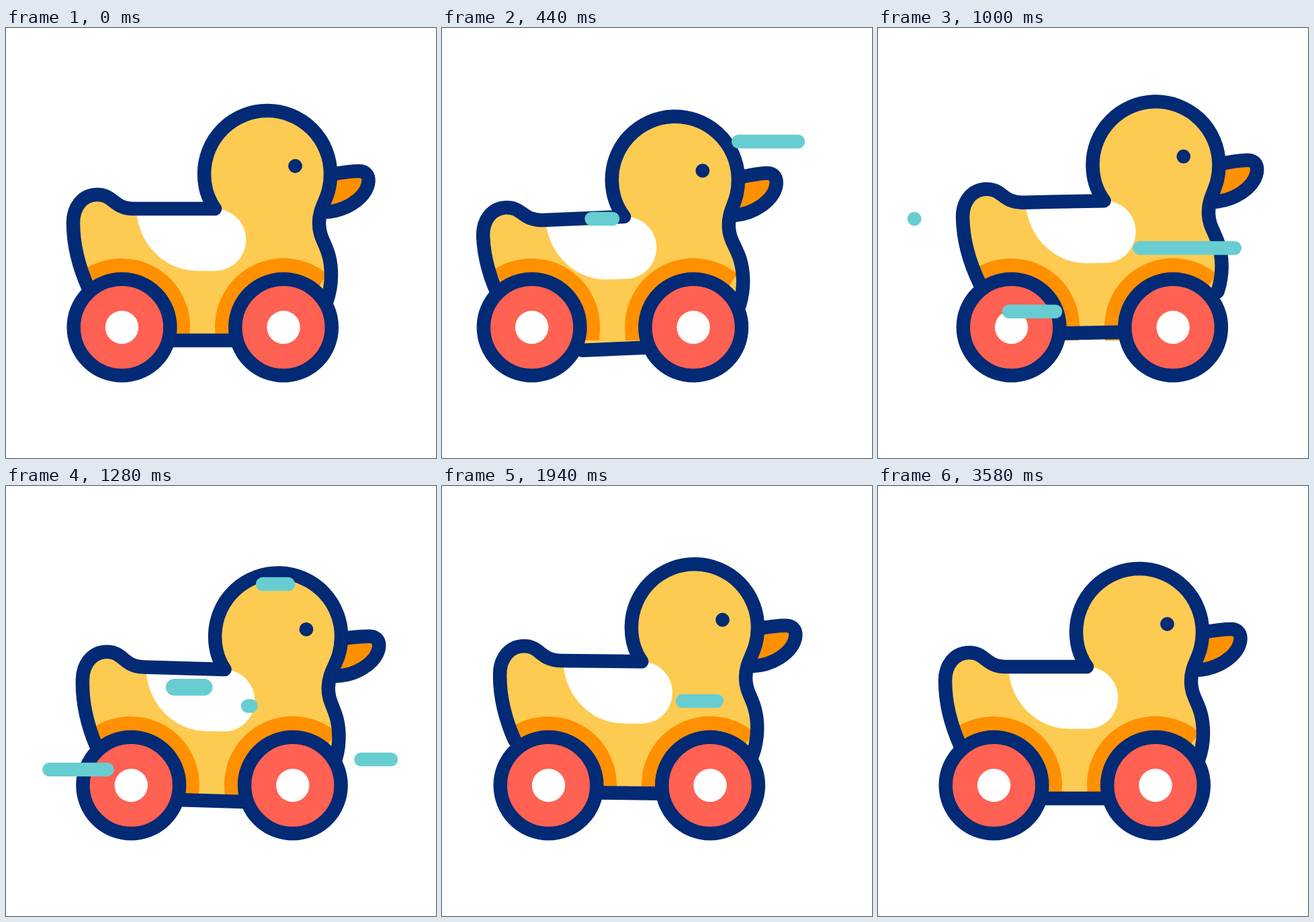
Write an HTML page that moves like this. It is 640x640 px and loops after 3600 ms.

```html
<!DOCTYPE html>
<html lang="en">
<head>
<meta charset="utf-8">
<title>Rolling toy duck</title>
<style>
  html, body { margin: 0; height: 100%; overflow: hidden; background: #fff; }
  svg { display: block; width: 100%; height: 100%; }
  .ink { fill: none; stroke: #032a75; stroke-width: 20.5; stroke-linecap: round; stroke-linejoin: round; }
  .yellow { fill: #fdcb52; }
  .orange { fill: #ff9100; }
  .white { fill: #fff; }
  .wheel { fill: #ff6152; }
  #streaks line { stroke: #68cdd1; stroke-width: 20.5; stroke-linecap: round; }
</style>
</head>
<body>
<svg viewBox="0 0 640 640">
  <defs>
    <path id="shape" d="M240 465H345M123 388C108 355 100 320 100 290C100 265 115 248 136 248C160 248 160 269 190 269H311Q295 247 295 217A94 94 0 0 1 483 217C483 255 466 262 466 291C466 318 484 325 484 368Q484 388 477 408"/>
    <g id="wheel">
      <circle class="ink wheel" style="fill:#ff6152" r="71.8"/>
      <circle class="white" r="24.7"/>
    </g>
  </defs>
  <g class="body">
    <path class="ink" style="fill:#ff9100" d="M483 218C500 215 512 213 525 213C537 213 541 221 539 232C534 254 505 273 474 274"/>
    <path class="yellow" d="M172 465L123 388C108 355 100 320 100 290C100 265 115 248 136 248C160 248 160 269 190 269H311Q295 247 295 217A94 94 0 0 1 483 217C483 255 466 262 466 291C466 318 484 325 484 368Q484 388 477 408L413 465Z"/>
    <path class="white" d="M194 270C196 320 235 361.500 285 361.500H311A46 46 0 0 0 311 269Z"/>
  </g>
  <g class="cart">
    <path class="orange" d="M117 359A102 102 0 0 1 274 445L273 465H172Z"/>
    <path class="orange" d="M312 465L311 445A102 102 0 0 1 478 366L413 465Z"/>
  </g>
  <g class="body">
    <use href="#shape" class="ink"/>
    <circle cx="430.5" cy="205.5" r="10.400" fill="#032a75"/>
  </g>
  <g class="cart">
    <use href="#wheel" x="172.500" y="445.500"/>
    <use href="#wheel" x="413" y="445.500"/>
  </g>
  <g id="streaks"></g>
</svg>
<script>
const LOOP = 3600;

// Keys are [time, value] pairs.
const shift = [[0, 0], [580, -45], [1100, 33], [1600, -34], [2210, 0]];
const bounce = [[0, 0], [465, 12.7], [930, -12.5], [1395, 6.2], [1830, -9.5], [2240, 0]];
const tilt = [[0, 0], [660, -3.2], [1540, 3], [2120, 0]];

// y, start x, end x, start time, duration, width
const streaks = [
  [169, 530, 290, 236],
  [284, 254, 54, 313],
  [327.5, 590, 360, 624],
  [422, 264, 64, 804],
  [407, 573, 343, 1138],
  [299.5, 295, 30, 1148, 700, 25],
  [146, 420, 150, 1160],
  [320, 558, 358, 1350, 772]
];

const ease = u => (1 - Math.cos(Math.PI * Math.min(1, Math.max(0, u)))) / 2;
const mix = (a, b, u) => a + (b - a) * ease(u);

function sample(keys, t) {
  const i = keys.findIndex(key => key[0] > t);
  if (i < 0) return keys[keys.length - 1][1];
  const [t0, a] = keys[i - 1], [t1, b] = keys[i];
  return mix(a, b, (t - t0) / (t1 - t0));
}

const bodies = document.querySelectorAll('.body');
const carts = document.querySelectorAll('.cart');
const group = document.getElementById('streaks');
const lines = streaks.map(([y, , , , , width = 20.5]) => {
  const line = document.createElementNS('http://www.w3.org/2000/svg', 'line');
  line.setAttribute('y1', y);
  line.setAttribute('y2', y);
  line.style.strokeWidth = width;
  return group.appendChild(line);
});

function draw(t) {
  const x = sample(shift, t), y = sample(bounce, t), angle = sample(tilt, t);
  carts.forEach(el => el.setAttribute('transform', `translate(${x} 0)`));
  bodies.forEach(el => el.setAttribute('transform',
    `translate(${x} ${y}) rotate(${angle} 292 294)`));

  streaks.forEach(([, from, to, start, duration = 700], i) => {
    const p = (t - start) / duration, line = lines[i];
    line.style.display = p > 0 && p < 1 ? '' : 'none';
    line.setAttribute('x1', mix(from, to, p / 0.7));
    line.setAttribute('x2', mix(from, to, (p - 0.3) / 0.7));
  });
}

let origin;
function tick(now) {
  origin ??= now;
  draw((now - origin) % LOOP);
  requestAnimationFrame(tick);
}
draw(0);
requestAnimationFrame(tick);
</script>
</body>
</html>
```
